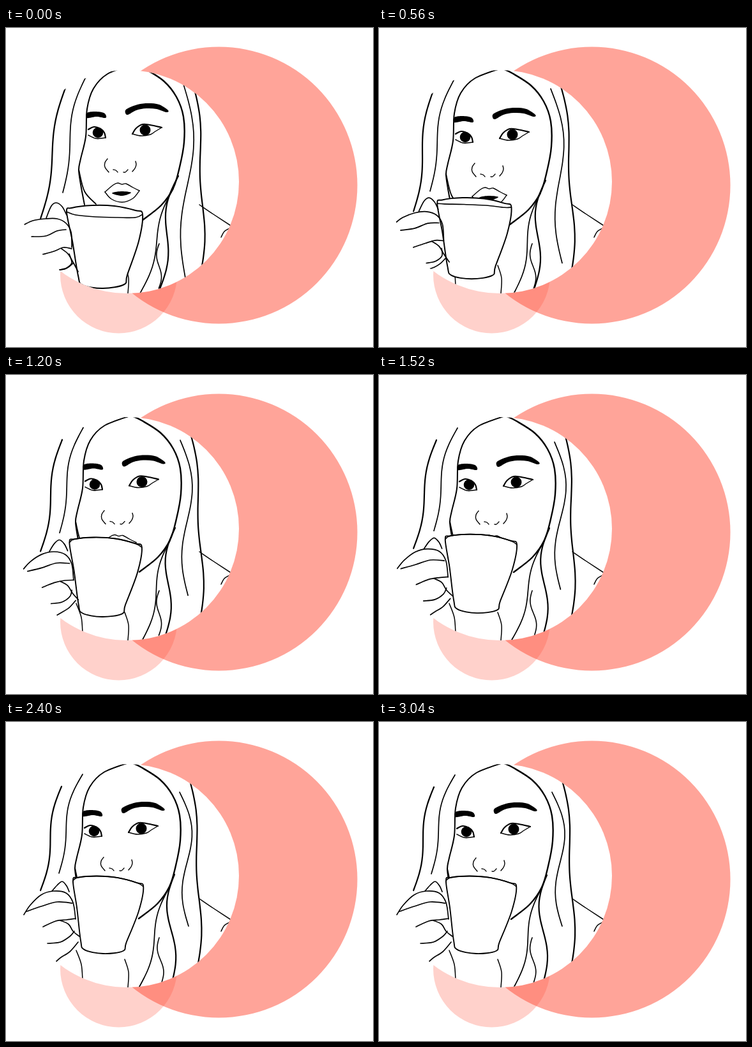
Animation, 575 px wide and 500 px high, one loop 3.12 s. Source, as an HTML page with a canvas:

```html
<!DOCTYPE html>
<html lang="en">
<head>
<meta charset="utf-8">
<title>Coffee sip</title>
<style>
html, body { margin: 0; width: 100%; height: 100%; overflow: hidden; background: #fff; }
canvas { display: block; }
</style>
</head>
<body>
<canvas id="stage" width="575" height="500"></canvas>
<script>
const ctx = document.getElementById('stage').getContext('2d');
const LOOP = 3120, SIP = 2400;

// time, pupil x, pupil y, sideways sway of cup and hand
const keys = [
  [0, 218, 160, 0], [560, 209, 167, -7], [880, 211, 167, -5], [1520, 215, 168, 1],
  [2000, 211, 168, -2], [SIP, 212, 167, 0], [3040, 211, 168, 0],
];

const parse = s => s.split(' ').map(p => p.split(',').map(Number));
const mix = (a, b, u) => a + (b - a) * u;
const mixPoints = (a, b, u) => a.map((p, i) => p.map((v, j) => mix(v, b[i][j], u)));

// Face, measured from the right pupil
const faceLines = [
  [2, '-17,-104 -59,-88 -81,-65 -91,-33 -93,10 -101,45 -104,62 -101,85 -95,117'],
  [1.8, '-104,62 -95,96 -77,116'],
  [2.4, '-17,-104 0,-96 29,-77 49,-52 60,-21 61,19 54,58 44,91 25,118 -4,141'],
  [2.2, '-20,6 -14,-3 -4,-9 8,-8 26,-4'],
  [1.4, '-20,6 -6,9 8,7 16,2 26,-4'],
  [2.2, '-89,-1 -80,-5 -70,-2 -64,4 -62,12'],
  [1.6, '-89,8 -78,13 -70,13 -62,12'],
  [1.4, '-59,45 -63,51 -63,58 -57,66'],
  [1.4, '-50,62 -46,63 -43,66'],
  [1.4, '-34,66 -31,66 -27,62'],
  [1.4, '-15,49 -14,54 -16,60 -20,65'],
  [1.4, '-63,97 -50,86 -43,83 -36,85 -30,84 -19,90 -9,95'],
  [1.4, '-63,97 -53,108 -36,113 -19,107 -9,95'],
].map(([w, s]) => [w, parse(s)]);
const faceFills = [
  '-31,-27 -29,-33 -12,-40 5,-42 22,-40 36,-31 33,-28 18,-33 2,-34 -14,-31 -27,-24',
  '-91,-27 -78,-29 -65,-27 -61,-22 -63,-19 -76,-21 -91,-19',
  '-52,99 -38,96 -22,98 -36,103',
].map(parse);

// Cup, measured from its left rim
const rimBack = parse('0,1 8,-5 40,-9 75,-8 108,-1 119,5');
const rimFront = parse('0,1 14,6 45,9 80,10 108,10 119,5');
const cup = [...rimBack, ...parse('113,47 95,100 90,115 57,121 25,116 18,101 9,47')];

// Hand lines: cup lowered, cup raised
const hand = [
  ['63,298 71,279 79,274 88,280 95,293', '72,265 80,256 88,250 95,257 99,266'],
  ['29,308 42,302 62,299 80,299 94,306 102,320 103,344', '28,302 38,287 55,271 74,265 94,268 105,283 109,309'],
  ['40,327 62,326 80,318 94,316', '32,297 55,289 80,282 104,284'],
  ['57,355 75,350 90,344 103,346', '58,321 78,312 95,310 109,308'],
  ['84,379 95,376 103,368 99,354', '65,347 85,345 100,336 107,328'],
  ['87,346 97,354 105,367 113,382', '85,311 98,317 105,328 115,336'],
  ['84,379 92,378 99,374 105,369', '79,375 86,369 100,360 113,345'],
].map(pair => pair.map(parse));

const clothes = [
  '110,358 118,380 120,405', '186,372 192,392 191,416',
  '303,277 325,292 354,311', '350,314 342,319 337,328',
].map(parse);

// Smooth curve through all points
function trace(pts, closed) {
  const n = pts.length;
  const at = i => closed ? pts[(i + n) % n] : pts[Math.max(0, Math.min(n - 1, i))];
  ctx.beginPath();
  ctx.moveTo(...pts[0]);
  for (let i = 0; i < (closed ? n : n - 1); i++) {
    const [a, b, c, d] = [at(i - 1), at(i), at(i + 1), at(i + 2)];
    ctx.bezierCurveTo(b[0] + (c[0] - a[0]) / 6, b[1] + (c[1] - a[1]) / 6,
      c[0] - (d[0] - b[0]) / 6, c[1] - (d[1] - b[1]) / 6, ...c);
  }
}

function stroke(pts, width, closed) {
  trace(pts, closed);
  ctx.lineWidth = width;
  ctx.stroke();
}

function disc(x, y, r, color) {
  ctx.beginPath();
  ctx.arc(x, y, r, 0, 7);
  ctx.fillStyle = color;
  ctx.fill();
}

// Wavy lock of hair between two points
function strand(width, x0, y0, x1, y1, bow, wave, turns = 1) {
  const pts = [];
  for (let u = 0; u < 1.01; u += 1 / 12) {
    const bend = bow * Math.sin(Math.PI * u) + wave * Math.sin(2 * Math.PI * turns * u);
    pts.push([mix(x0, x1, u) + bend, mix(y0, y1, u)]);
  }
  stroke(pts, width);
}

function drawHair(t, x, y, lift) {
  // Loose ends land a little differently in every drawing.
  const loose = i => 3 * Math.sin(t * 1.7 + i * 2.4);
  strand(2.2, x - 125, y - 66, 54, mix(299, 264, lift), -1, -5);
  strand(1.7, x - 92, y - 85, x - 129, y + mix(98, 70, lift), -7, -5);
  strand(2.2, x + 75, 88, 303 + loose(1), 384, 9, 4, 1.5);
  strand(1.7, x + 60, mix(88, 110, lift), 284 + loose(2), mix(392, 320, lift), 6, 11);
  strand(2.2, x + 52, y + 72, mix(239, 260, lift) + loose(3), 408, -4, -8);
  strand(1.7, x + 44, y + 92, 211 + loose(4), 415, 0, -6);
  strand(1.6, 240, 338, 241 + loose(5), 408, 0, -4);
}

function drawFace(x, y) {
  ctx.save();
  ctx.translate(x, y);
  for (const [w, pts] of faceLines) stroke(pts, w);
  ctx.fillStyle = '#000';
  for (const pts of faceFills) {
    trace(pts, true);
    ctx.fill();
  }
  disc(0, 0, 8.5, '#000');
  disc(-74, 4, 8.3, '#000');
  ctx.restore();
}

function drawCup(t, lift, sway) {
  const size = mix(1, 0.93, lift);
  const open = Math.max(0, 1 - (t / 880) ** 2);
  ctx.save();
  ctx.translate(mix(95, 105, lift) + sway, mix(287, 248, lift));
  ctx.rotate(0.05 * lift);
  ctx.scale(size, size);
  trace(cup, true);
  ctx.fillStyle = '#fff';
  ctx.fill();
  stroke(cup, 2, true);
  stroke(mixPoints(rimBack, rimFront, open), 1.6);
  ctx.restore();
}

function drawHand(lift, sway) {
  ctx.save();
  ctx.translate(sway / 2, 0);
  for (const [low, high] of hand) stroke(mixPoints(low, high, lift), 1.7);
  ctx.restore();
}

function draw(t) {
  const k = Math.max(1, keys.findIndex(key => key[0] >= t));
  const [a, b] = [keys[k - 1], keys[k]];
  const [, x, y, sway] = a.map((v, i) => mix(v, b[i], (t - a[0]) / (b[0] - a[0])));
  const lift = 1 - Math.max(0, 1 - t / SIP) ** 1.5;

  ctx.fillStyle = '#fff';
  ctx.fillRect(0, 0, 575, 500);
  disc(333.5, 246.5, 217, '#ffa499');
  disc(176.5, 387, 91.5, 'rgba(255,77,54,.26)');
  ctx.save();
  disc(190, 241, 175, '#fff');
  ctx.clip();
  ctx.strokeStyle = '#000';
  ctx.lineCap = ctx.lineJoin = 'round';
  drawHair(t, x, y, lift);
  drawFace(x, y);
  for (const pts of clothes) stroke(pts, 1.5);
  drawCup(t, lift, sway);
  drawHand(lift, sway);
  ctx.restore();
}

// Drawings are held for 160 ms, a few for 240 ms.
function held(t) {
  if (t < 240) return 0;
  if (t >= 2000 && t < 2240) return 2000;
  const start = t < 2000 ? 240 : 2240;
  return start + 160 * Math.floor((t - start) / 160);
}

const origin = performance.now();
function tick() {
  draw(held((performance.now() - origin) % LOOP));
  requestAnimationFrame(tick);
}
tick();
</script>
</body>
</html>
```
